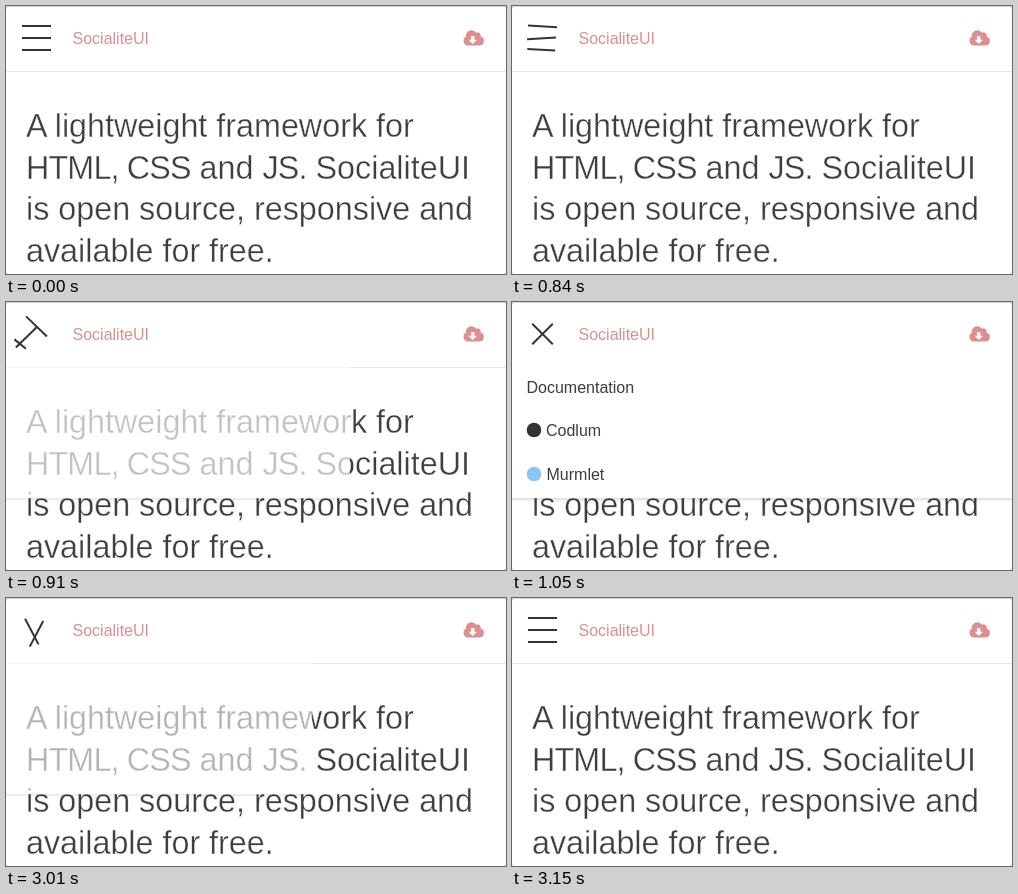
Recreate the animation shown at these times as an HTML page. Size 500 px wide and 268 px high, loop 3.71 s.

```html
<!DOCTYPE html>
<html lang="en">
<head>
<meta charset="utf-8">
<title>Mobile menu</title>
<style>
  html, body { margin: 0; width: 100%; height: 100%; overflow: hidden; background: #fff; }
  svg { display: block; width: 100%; height: 100%; }
  text { font-family: "Liberation Sans", Arial, sans-serif; font-size: 16px; fill: #3c3c3c; }
  .lead text { font-size: 32.3px; fill: #3e3e3e; stroke: #fff; stroke-width: .4px; }
  .caps { letter-spacing: -.85px; }
  .brand { fill: #dd8f8f; }
  .bars line { stroke: #333; stroke-width: 2; }
</style>
</head>
<body>
<svg viewBox="0 0 500 268">
  <defs>
    <linearGradient id="shade" x1="0" y1="0" x2="0" y2="1">
      <stop offset="0" stop-color="#000" stop-opacity=".14"/>
      <stop offset="1" stop-color="#000" stop-opacity="0"/>
    </linearGradient>
  </defs>

  <rect width="500" height="268" fill="#d8d8d8"/>
  <rect y="1" width="500" height="267" rx="3" fill="#fff"/>
  <rect y="65" width="500" height="1" fill="#e8e8e8"/>

  <g class="lead">
    <text x="20" y="131">A lightweight framework for</text>
    <text x="20" y="172.6"><tspan class="caps">HTML, CSS</tspan> and <tspan class="caps">JS.</tspan> SocialiteUI</text>
    <text x="20" y="214.2">is open source, responsive and</text>
    <text x="20" y="255.8">available for free.</text>
  </g>

  <g id="menu">
    <rect y="196" width="500" height="4" fill="url(#shade)"/>
    <rect y="65" width="500" height="131" fill="#fff"/>
    <text x="14.5" y="91">Documentation</text>
    <circle cx="22" cy="128" r="7.3" fill="#333"/>
    <text x="34" y="134">Codlum</text>
    <circle cx="22" cy="172" r="7.3" fill="#8fc3f5"/>
    <text x="34.5" y="178">Murmlet</text>
  </g>

  <text class="brand" x="66.5" y="38">SocialiteUI</text>
  <path class="brand" d="M462 39.5a4.8 4.8 0 0 1-2-9a5.6 5.6 0 0 1 10.2-3.8a3.2 3.2 0 0 1 4.4 3.8a4.6 4.6 0 0 1-1.2 9z"/>
  <path d="M465.2 30h3.2v3.8h2.6l-4.2 4.2l-4.2-4.2h2.6z" fill="#fff"/>

  <g class="bars"><line/><line/><line/></g>
</svg>
<script>
const LOOP = 3710, TICK = 70, WIDTH = 500;
const SLIDE = 210, TURN = 174;
const menu = document.getElementById("menu");
const [top3, mid3, low3] = document.querySelectorAll(".bars line");

const ramp = (time, from, span) => Math.min(1, Math.max(0, (time - from) / span));
const easeOut = x => 1 - (1 - x) ** 2.87;
const easeIn = x => x ** 1.7;

function place(bar, x, y, angle, length) {
  const half = Math.max(0, length) / 2;
  bar.setAttribute("x1", -half);
  bar.setAttribute("x2", half);
  bar.setAttribute("transform", `translate(${x} ${y}) rotate(${angle})`);
}

// q runs from 0 (three bars) to 1 (cross)
function drawIcon(q) {
  const swing = Math.sin(Math.PI * q);
  const drop = q + 6 * q ** 4 * (1 - q); // overshoots, then settles
  place(top3, 30.5, 20 + 12 * drop, 135 * q, 29);
  place(mid3, 30.5 - 12 * swing, 32 + 4 * swing, -135 * q, 29);
  place(low3, 30.5 - 50 * q, 44 - 6 * q, 120 * q, 29 * (1 - 1.5 * q));
}

function draw(time) {
  const open = easeOut(ramp(time, 840, SLIDE)) - easeOut(ramp(time, 2977, SLIDE));
  menu.setAttribute("transform", `translate(${WIDTH * (open - 1)} 0)`);
  menu.setAttribute("opacity", open);
  drawIcon(easeIn(ramp(time, 820, TURN)) - easeIn(ramp(time, 2958, TURN)));
}

const start = performance.now();
function tick() {
  const time = (performance.now() - start) % LOOP;
  draw(Math.floor(time / TICK) * TICK); // the picture holds for each tick
  requestAnimationFrame(tick);
}
tick();
</script>
</body>
</html>
```
